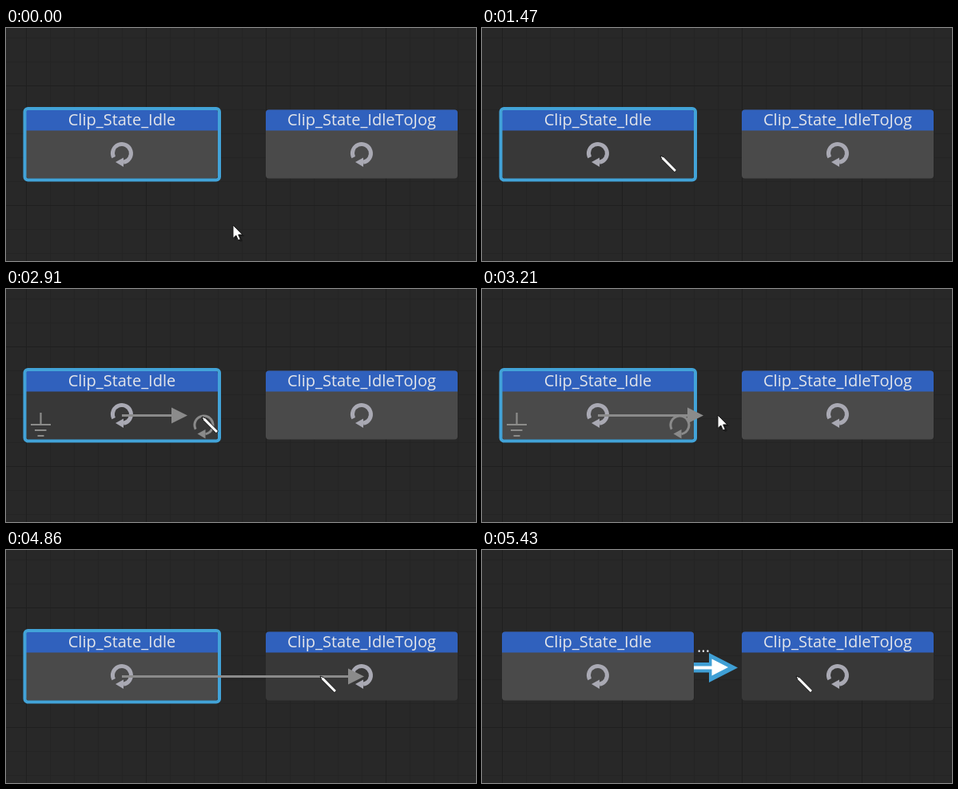
Write an HTML page that moves like this. It is 588 by 292 pixels and loops after 7.09 s.

```html
<!DOCTYPE html>
<html lang="en">
<head>
<meta charset="utf-8">
<title>State graph</title>
<style>
  html, body { margin: 0; width: 100%; height: 100%; overflow: hidden; background: #282828; }
  svg { display: block; width: 588px; height: 292px; }
  text { font: 20px "Open Sans", "Noto Sans", sans-serif; font-kerning: none; fill: #e4e6ea; }
</style>
</head>
<body>
<svg viewBox="0 0 588 292">
  <defs>
    <g id="loop">
      <path d="M-10.3 5.2A11.5 11.5 0 1 1 2 11.3" fill="none" stroke="currentColor"/>
      <path d="M-8 11L2 5.5V17z" fill="currentColor"/>
    </g>
  </defs>
  <g id="grid" shape-rendering="crispEdges"></g>
  <g id="nodes"></g>
  <rect id="selection" x="23.5" y="101" width="243.500" height="89.500" rx="4" fill="none" stroke="#42a3d8" stroke-width="4"/>
  <g id="targets">
    <path d="M43.500 155V170M31 170H56M36 177H50.500M39.500 184H47.500" fill="none" stroke="#8c8c8a" stroke-width="2.200"/>
    <use href="#loop" x="247.500" y="170.500" color="#8a8a8a" stroke-width="3"/>
  </g>
  <g id="link">
    <path d="M265 141H284V129L320 147.500L284 166V153.500H265z" fill="#3f9fd5"/>
    <path d="M265 145.500H287.500V136.500L308 147L287.500 157.500V149.500H265z" fill="#fff"/>
    <text x="269" y="128">...</text>
  </g>
  <g id="drag" fill="#8b8b8b"><path id="shaft"/><path id="head" d="M-20 148.500V168.500L0 158.500z"/></g>
  <g id="cursor" stroke-linejoin="round">
    <g id="pointer">
      <path d="M2 2V19L6 15.500L9 21L12 20L9.500 14H14.500z" fill="#000" opacity=".3"/>
      <path d="M0 0V16.500L3.800 13L6.500 19L9.300 17.800L6.700 12H11.800z" fill="#fff" stroke="#151515"/>
    </g>
    <path id="pen" d="M0 0L4.500 1.800L20.500 18L18 20.800L1.800 4.500z" fill="#fff" stroke="#151515"/>
  </g>
</svg>
<script>
const LOOP = 7090, STEP = 60, START = 570;
const LIGHT = '#4a4a4a', DARK = '#383838';
const $ = id => document.getElementById(id);

// time, x, y
const path = [
  [570, 284, 247], [1290, 230, 164], [1470, 223, 160], [2730, 223, 160],
  [2790, 225, 160], [2910, 245, 160], [3210, 295, 158], [3450, 325, 157],
  [3630, 353, 157], [3990, 393, 158]
];

function drawGrid() {
  let minor = '', major = '';
  for (let x = 25; x < 588; x += 30) {
    const d = `M${x}.5 0V292`;
    (x - 25) % 150 ? minor += d : major += d;
  }
  for (let y = 12; y < 292; y += 30) {
    const d = `M0 ${y}.5H588`;
    (y - 72) % 150 ? minor += d : major += d;
  }
  $('grid').innerHTML = `<path d="${minor}" stroke="#242424"/><path d="${major}" stroke="#1f1f1f"/>`;
}

function drawNode(id, x, label) {
  $('nodes').innerHTML += `<g transform="translate(${x} 0)">
    <rect id="${id}" y="102.5" width="240" height="86" rx="4"/>
    <path d="M0 128.5V106.500a4 4 0 0 1 4-4H236a4 4 0 0 1 4 4V128.500z" fill="#3061bd"/>
    <text x="120" y="122" text-anchor="middle">${label}</text>
    <use href="#loop" x="120" y="157" color="#a9a9b3" stroke-width="5"/>
  </g>`;
}

function cursorAt(t) {
  const q = START + Math.floor((t - START) / STEP) * STEP;
  const i = path.findIndex(p => p[0] > q);
  if (i === 0) return path[0].slice(1);
  if (i < 0) return path[path.length - 1].slice(1);
  const [t0, x0, y0] = path[i - 1], [t1, x1, y1] = path[i];
  const k = (q - t0) / (t1 - t0);
  return [x0 + (x1 - x0) * k, y0 + (y1 - y0) * k];
}

const show = (id, on) => $(id).setAttribute('display', on ? 'inline' : 'none');

function render(t) {
  const [x, y] = cursorAt(t);
  const within = (a, b) => t >= a && t < b;
  const overFirst = x < 265 && y < 189;
  const overSecond = x > 325 && !within(5110, 5430);
  $('first').setAttribute('fill', overFirst ? DARK : LIGHT);
  $('second').setAttribute('fill', overSecond ? DARK : LIGHT);

  const pen = t >= 4060 || (t >= 1470 && overFirst);
  show('pen', pen);
  show('pointer', !pen);
  $('cursor').setAttribute('transform', `translate(${x} ${y})`);

  show('selection', t < 4920);
  show('targets', within(2790, 3510));
  show('link', t >= 4920);
  show('drag', within(2330, 5370));

  // The line trails the cursor, then snaps to the second node.
  const tip = t < 3510 ? cursorAt(t - 2 * STEP)[0] + 2 : 448;
  $('shaft').setAttribute('d', `M145 157H${tip - 18}V160H145z`);
  $('head').setAttribute('transform', `translate(${tip} 0)`);
}

drawGrid();
drawNode('first', 25, 'Clip_State_Idle');
drawNode('second', 325, 'Clip_State_IdleToJog');

const begin = performance.now();
function tick() {
  render((performance.now() - begin) % LOOP);
  requestAnimationFrame(tick);
}
tick();
</script>
</body>
</html>
```
